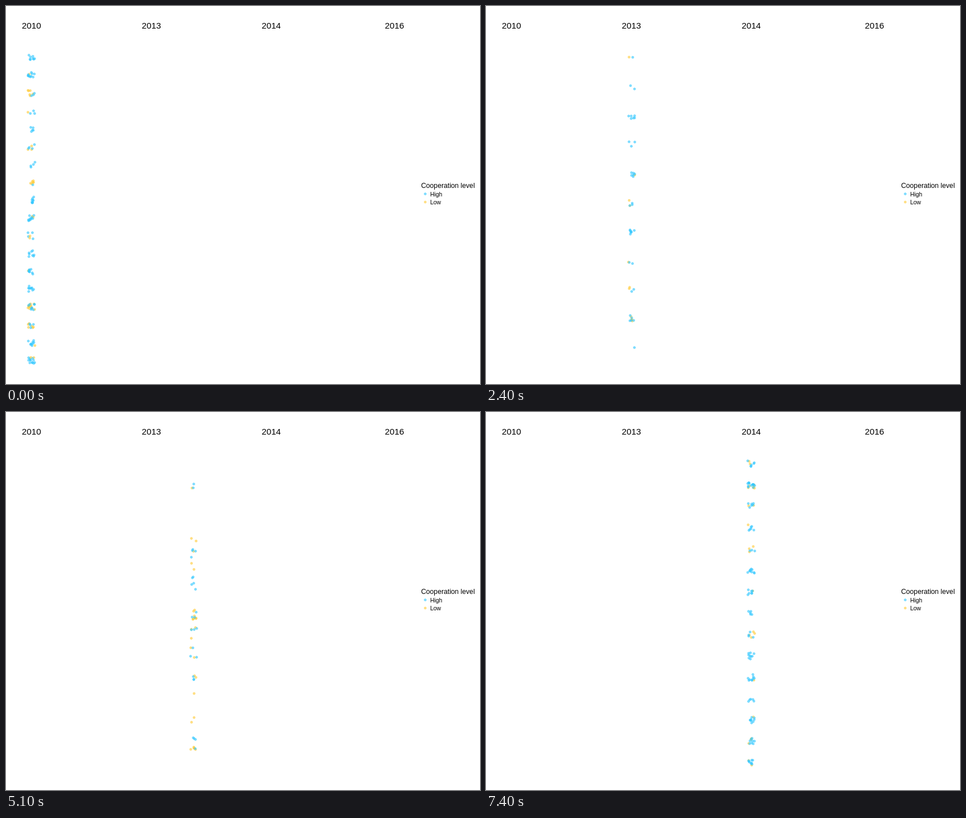
Animation of 837x669 px, one loop 8 s. Source, as an HTML page with a canvas:

```html
<!DOCTYPE html>
<html lang="en">
<head>
<meta charset="utf-8">
<title>Cooperation level by year</title>
<style>
  html, body { margin: 0; width: 100%; height: 100%; overflow: hidden; background: #fff; }
  canvas, svg { position: absolute; left: 0; top: 0; width: 837px; height: 669px; }
  text { font-family: "Liberation Sans", Arial, sans-serif; fill: #000; }
  .year { font-size: 15.2px; text-anchor: middle; }
  .title { font-size: 12.2px; }
  .key { font-size: 10.4px; }
</style>
</head>
<body>
<canvas id="stage" width="837" height="669"></canvas>
<svg viewBox="0 0 837 669">
  <text class="year" x="45" y="40">2010</text>
  <text class="year" x="256.7" y="40">2013</text>
  <text class="year" x="468.4" y="40">2014</text>
  <text class="year" x="686" y="40">2016</text>
  <text class="title" x="733" y="322">Cooperation level</text>
  <text class="key" x="749" y="336.5">High</text>
  <text class="key" x="749" y="350.5">Low</text>
</svg>
<script>
const ctx = document.getElementById('stage').getContext('2d');
const LOOP = 8000, STEP = 100, STEPS = 20;
const HIGH = 'rgba(51,200,255,.6)', LOW = 'rgba(255,203,60,.6)';

// Each year is a column of evenly spaced rows.
const Y2010 = { x: 45, top: 91, gap: 31.55 };
const Y2013 = { x: 256.7, top: 92, gap: 51.2 };
const Y2014 = { x: 468.4, top: 91.5, gap: 37.8 };

let seed = 7;
function random() {
  seed = (seed + 0x6D2B79F5) | 0;
  let t = Math.imul(seed ^ (seed >>> 15), 1 | seed);
  t = (t + Math.imul(t ^ (t >>> 7), 61 | t)) ^ t;
  return ((t ^ (t >>> 14)) >>> 0) / 4294967296;
}

// A jittered place in one row of a year.
const spot = (year, row) => ({
  x: year.x + (random() - .5) * 12.5,
  y: year.top + row * year.gap + (random() - .5) * 11
});

// Dots per row.
const crowd = (year, counts, color) => counts.flatMap((n, row) =>
  Array.from({ length: n }, () => ({ from: spot(year, row), row, color })));

// Start row -> the rows its dots travel to.
const travel = (from, to, routes, color) => Object.entries(routes).flatMap(([row, ends]) =>
  ends.map(end => ({ from: spot(from, +row), to: spot(to, end), row: +row, color })));

const leg1 = [
  ...travel(Y2010, Y2013, {
    2: [4], 5: [9], 7: [8, 8], 10: [5, 5], 15: [9, 9, 9], 17: [0, 7]
  }, LOW),
  ...travel(Y2010, Y2013, {
    0: [2, 6, 6], 5: [9], 7: [8], 8: [2, 2, 4, 4, 4, 6, 6], 10: [1, 5, 5],
    11: [5, 6, 7, 7], 12: [2, 2, 2, 6], 13: [3, 3, 3, 4, 4, 4], 14: [9],
    15: [6, 9, 9, 9], 16: [8, 10], 17: [0, 1]
  }, HIGH)
];
const leg2 = [
  ...travel(Y2013, Y2014, {
    0: [3], 2: [5, 5, 8], 3: [4, 12], 4: [4], 5: [8, 8, 8, 8, 8, 8, 12], 6: [7],
    7: [2, 11, 13], 8: [2, 3, 14], 9: [6, 12], 10: [1, 13, 13, 13, 13, 13]
  }, LOW),
  ...travel(Y2013, Y2014, {
    0: [3, 3], 1: [10, 14], 3: [4, 4, 4], 4: [5, 5, 6, 6], 5: [8], 6: [5, 7, 7],
    7: [3, 11], 8: [2], 9: [2, 3, 6, 6, 14, 14, 14], 10: [1, 13]
  }, HIGH)
];

// Dots that are seen in 2010 only, together with those about to leave.
const all2010 = [
  ...crowd(Y2010, [0, 1, 5, 1, 0, 2, 0, 4, 0, 2, 0, 0, 1, 0, 12, 3, 1], LOW),
  ...crowd(Y2010, [5, 10, 3, 3, 5, 3, 4, 0, 2, 10, 1, 4, 4, 3, 7, 0, 7, 10], HIGH),
  ...leg1
];
const all2014 = [
  ...crowd(Y2014, [2, 6, 2, 1, 3, 0, 1, 0, 4, 0, 1, 0, 1, 3, 2], LOW),
  ...crowd(Y2014, [6, 13, 6, 6, 3, 9, 7, 5, 4, 9, 9, 5, 9, 8, 8], HIGH)
];

function drawDot(x, y, color) {
  ctx.fillStyle = ctx.strokeStyle = color;
  ctx.beginPath();
  ctx.arc(x, y, 2, 0, Math.PI * 2);
  ctx.fill();
  ctx.stroke();
}

function drawDots(dots, p = 0) {
  for (const { from, to = from, color } of dots) {
    drawDot(from.x + (to.x - from.x) * p, from.y + (to.y - from.y) * p, color);
  }
}

// Linear travel in hard steps, holding at the end.
const progress = (t, start) => Math.min(1, (Math.floor((t - start) / STEP) + 1) / STEPS);

function drawScene(t) {
  if (t < 500) drawDots(all2010);
  else if (t < 3400) drawDots(leg1, progress(t, 500));
  else if (t < 4500) drawDots(leg2);
  else if (t < 7400) drawDots(leg2, progress(t, 4500));
  else drawDots(all2014);
}

const begin = performance.now();
function draw() {
  ctx.clearRect(0, 0, 837, 669);
  ctx.lineWidth = .75;
  drawScene(Math.max(0, performance.now() - begin) % LOOP);
  drawDot(740.3, 332.6, HIGH);
  drawDot(740.3, 347, LOW);
  requestAnimationFrame(draw);
}
draw();
</script>
</body>
</html>
```
